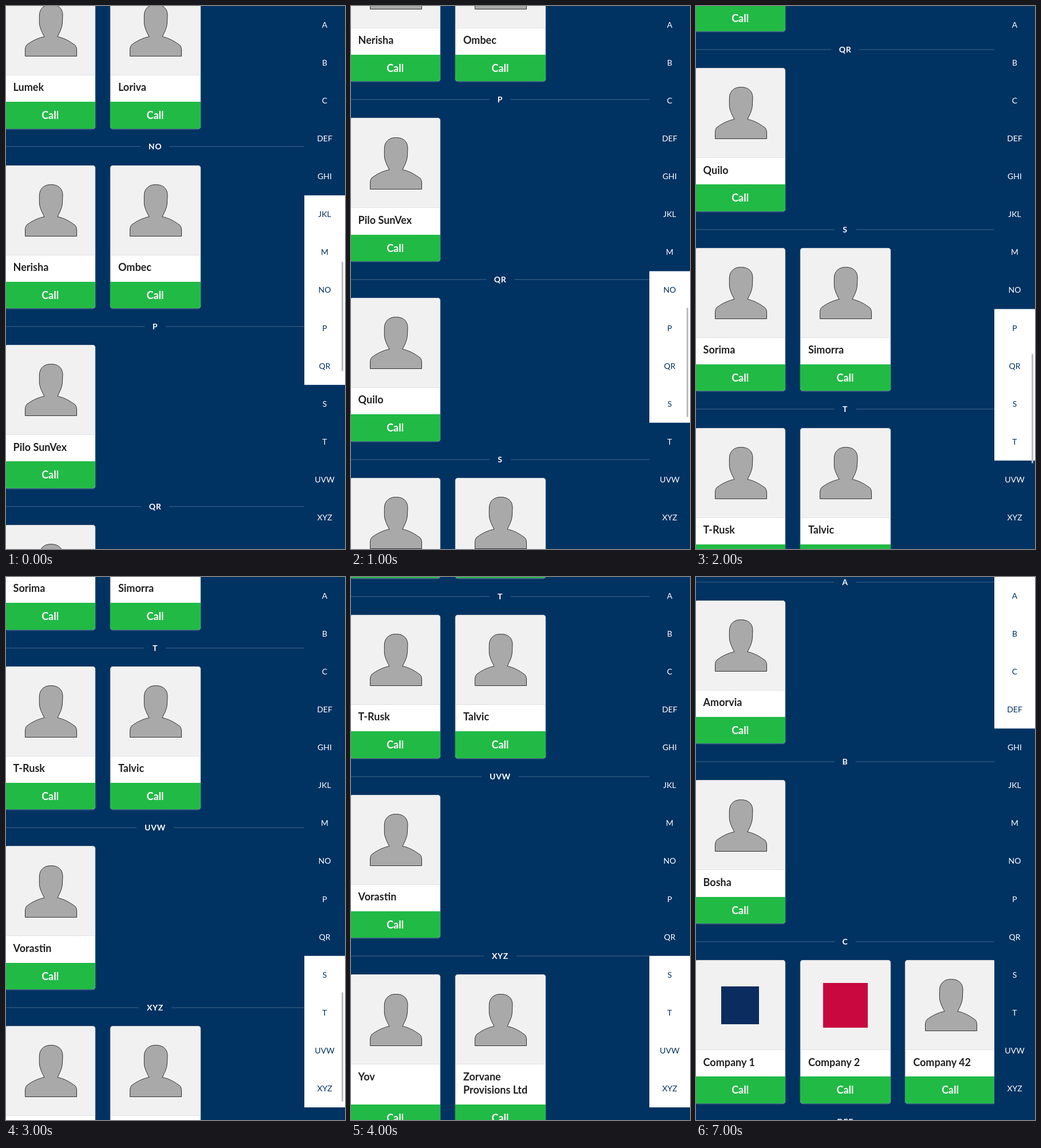
Write an HTML page that moves like this. It is 592x947 px and loops after 8000 ms.

```html
<!DOCTYPE html>
<html lang="en">
<head>
<meta charset="utf-8">
<title>Contacts</title>
<style>
  :root { --navy: #003262; --row: 66.07px; }
  html, body { margin: 0; width: 100%; height: 100%; overflow: hidden; background: var(--navy); }
  body { position: relative; font-family: Lato, sans-serif; }

  #view { position: absolute; left: 0; top: 0; width: 521px; height: 947px; overflow: hidden; }
  /* top rather than transform, so that edges snap to whole pixels */
  #page { position: absolute; left: 0; top: 0; width: 521px; animation: scroll 8s step-end infinite; }

  .group { position: absolute; left: 0; width: 521px; }
  .title {
    position: absolute; left: 0; right: 0; top: -42.2px; height: 20px;
    display: flex; align-items: center;
    color: #fff; font-weight: 700; font-size: 14px; line-height: 20px; letter-spacing: .05em;
  }
  .title::before, .title::after { content: ""; flex: 1; height: 2px; background: rgba(255, 255, 255, .13); }
  .title span { padding: 0 14px; }

  .card {
    position: absolute; top: 0; width: 158px; height: 249.6px;
    border-radius: 5px; background: #fff;
    box-shadow: 0 1px 3px -1px #d4d4d5, inset 0 0 0 1px #d4d4d5;
    font-weight: 700; font-size: 18px;
  }
  .photo {
    position: absolute; left: 1px; right: 1px; top: 1px; height: 156px; box-sizing: border-box;
    border-radius: 4px 4px 0 0; background: #f1f1f1; border-bottom: 1px solid #e2e2e2;
  }
  .photo svg { position: absolute; left: 33.8px; top: 32.2px; overflow: visible; }
  .mark { position: absolute; }
  .name { position: absolute; left: 14.4px; right: 14px; top: 166.4px; line-height: 23.1px; color: #212121; }
  .call {
    position: absolute; left: 0; right: 0; bottom: 0; height: 46.5px; line-height: 46.5px;
    border-radius: 0 0 5px 5px; background: #21ba45; color: #fff; text-align: center;
  }
  .tall .card { height: 272.7px; }

  .index {
    position: absolute; left: 521px; top: 0; width: 71px; height: calc(14 * var(--row));
    color: #fff; font-size: 14px; text-align: center;
  }
  .index div { height: var(--row); line-height: var(--row); }
  .active { background: #fff; color: var(--navy); animation: active 8s step-end infinite; }

  #thumb {
    position: absolute; left: 586px; top: 0; width: 3px; height: 191px;
    border-radius: 1.5px; background: #bdbdbd; animation: thumb 8s step-end infinite;
  }

  @keyframes scroll {
    0% { top: -1331.55px; }
    12.5% { top: -1727.4px; }
    25% { top: -2128.3px; }
    37.5% { top: -2708.1px; }
    50% { top: -2797.8px; }
    87.5%, 100% { top: 0; }
  }
  @keyframes active {
    0% { clip-path: inset(calc(5 * var(--row)) 0 calc(4 * var(--row))); }
    12.5% { clip-path: inset(calc(7 * var(--row)) 0 calc(3 * var(--row))); }
    25% { clip-path: inset(calc(8 * var(--row)) 0 calc(2 * var(--row))); }
    37.5% { clip-path: inset(calc(10 * var(--row)) 0 0); }
    87.5%, 100% { clip-path: inset(0 0 calc(10 * var(--row))); }
  }
  @keyframes thumb {
    0% { transform: translateY(446px); opacity: 1; }
    12.5% { transform: translateY(526px); opacity: 1; }
    25% { transform: translateY(606.5px); opacity: 1; }
    37.5% { transform: translateY(724px); opacity: 1; }
    50%, 100% { transform: translateY(724px); opacity: 0; }
  }
</style>
</head>
<body>
<div id="view"><div id="page"></div></div>
<div class="index"></div>
<div class="index active"></div>
<div id="thumb"></div>
<script>
  const PITCH = 313.67, FIRST = 40.8;
  const COLUMN = 183.35, LEFT = -1.8;
  const letters = ['A', 'B', 'C', 'DEF', 'GHI', 'JKL', 'M', 'NO', 'P', 'QR', 'S', 'T', 'UVW', 'XYZ'];
  const groups = [
    ['A', 'Amorvia'],
    ['B', 'Bosha'],
    ['C', 'Company 1', 'Company 2', 'Company 42'],
    ['DEF'],
    ['JKL', 'Lumek', 'Loriva'],
    ['NO', 'Nerisha', 'Ombec'],
    ['P', 'Pilo SunVex'],
    ['QR', 'Quilo'],
    ['S', 'Sorima', 'Simorra'],
    ['T', 'T-Rusk', 'Talvic'],
    ['UVW', 'Vorastin'],
    ['XYZ', 'Yov', 'Zorvane Provisions Ltd']
  ];
  // Contacts with a square picture: [size, colour]
  const marks = { 'Company 1': [66, '#0b2c5f'], 'Company 2': [78, '#c8083f'] };

  const person = `<svg width="91" height="91"><path fill="#a9a9a9" stroke="#333" stroke-width="1"
    d="M34 56.5 C31 51 28 45 27 41 Q25.3 37 25.3 32 V20 C25.3 8 33 .5 45.5 .5 C58 .5 66 7 66 19
       L65.3 34 Q65 39 62 46 L57 56.5 C67 58.5 76 63 85 69.5 Q90.5 72 90.5 80 V90.5 H.5 V80
       Q.5 72 5 69.5 C14 63 24 58.5 34 56.5 Z"/></svg>`;

  function picture(name) {
    if (!marks[name]) return person;
    const [size, color] = marks[name];
    return `<div class="mark" style="left:${78 - size / 2}px;top:${77.5 - size / 2}px;` +
      `width:${size}px;height:${size}px;background:${color}"></div>`;
  }

  const card = (name, col) => `<div class="card" style="left:${LEFT + col * COLUMN}px">
    <div class="photo">${picture(name)}</div>
    <div class="name">${name}</div>
    <div class="call">Call</div></div>`;

  document.getElementById('page').innerHTML = groups.map(([title, ...names], i) =>
    `<div class="group${title === 'XYZ' ? ' tall' : ''}" style="top:${FIRST + i * PITCH}px">
      <div class="title"><span>${title}</span></div>${names.map(card).join('')}</div>`).join('');

  for (const list of document.querySelectorAll('.index'))
    list.innerHTML = letters.map(l => `<div>${l}</div>`).join('');
</script>
</body>
</html>
```
